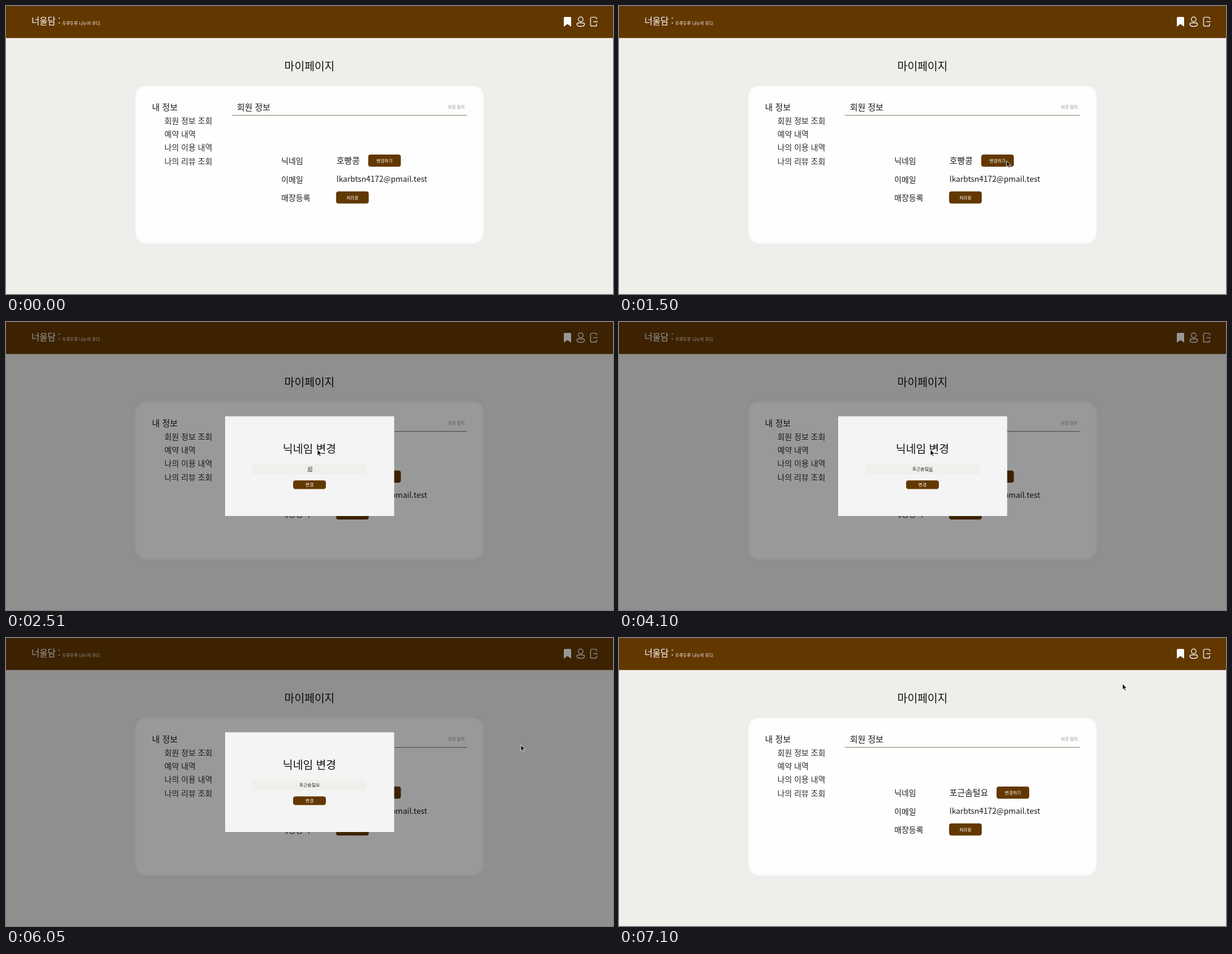
Recreate the animation shown at these times as an HTML page. Size 1000 by 475 pixels, loop 7.12 s.

```html
<!DOCTYPE html>
<html lang="ko">
<head>
<meta charset="utf-8">
<title>마이페이지</title>
<style>
  html, body { margin: 0; width: 100%; height: 100%; overflow: hidden; background: #f0eeeb; }
  svg { display: block; width: 100vw; height: 100vh; }
  text { font-family: "Noto Sans CJK KR", "Noto Sans CJK", "Noto Sans", sans-serif; white-space: pre; }
  .line { fill: none; stroke: #fff; stroke-width: 1.2; stroke-linecap: round; stroke-linejoin: round; }
  .composing { text-decoration: underline; }
</style>
</head>
<body>
<svg id="stage" viewBox="0 0 1000 475" xmlns="http://www.w3.org/2000/svg">
  <defs>
    <filter id="soft" x="-5%" y="-10%" width="110%" height="120%"><feGaussianBlur stdDeviation="2.2"/></filter>
    <clipPath id="cardClip"><rect x="210" y="128" width="580" height="266.5" rx="20"/></clipPath>
  </defs>
  <rect width="1000" height="475" fill="#f0eeeb"/>
  <rect width="1000" height="52.8" fill="#633800"/>

  <path fill="#fff" d="M919 19.5q0-1.5 1.5-1.5h9q1.5 0 1.5 1.5V34l-6-4.3-6 4.3z"/>
  <circle class="line" cx="946.8" cy="22" r="3.9"/>
  <path class="line" d="M943.5 27.8h6.6q3 0 3 2.3c0 2.4-3 3.6-6.3 3.6s-6.3-1.2-6.3-3.6q0-2.3 3-2.3z"/>
  <path class="line" d="M973 21.5v-1q0-2-2-2h-6q-2 0-2 2v10.700q0 2 2 2h6q2 0 2-2v-1.500M968 25.800h6.300"/>

  <rect x="210" y="128" width="580" height="266.5" rx="20" fill="#e8e6e4"/>
  <g clip-path="url(#cardClip)">
    <rect x="212.500" y="131" width="575" height="261.500" rx="18" fill="#fefefe" filter="url(#soft)"/>
  </g>
  <rect x="372" y="179.800" width="387.500" height="1.300" fill="#a0917f"/>
  <g id="page"></g>

  <g id="modal">
    <rect width="1000" height="475" fill="#000" opacity=".4"/>
    <rect x="361" y="155.500" width="278.500" height="164.500" fill="#f4f4f4"/>
    <rect x="406" y="233.500" width="188" height="18" rx="4" fill="#f0efeb"/>
  </g>
  <path id="cursor" d="M0 0v9.800l2.300-2.100 1.600 3.700 1.800-.8-1.600-3.600h3.100z" fill="#111" stroke="#fff" stroke-width=".8" stroke-linejoin="round"/>
</svg>
<script>
const LOOP = 7120, BROWN = '#633800';
const OLD_NAME = '호빵콩', NEW_NAME = '포근솜털요';
const OPEN = 1620, COMMIT = 4760, CLOSE = 6080, RENAME = 6240;
const $ = id => document.getElementById(id);
const page = $('page'), modal = $('modal'), cursor = $('cursor');

function add(parent, tag, attrs, content = '') {
  const el = document.createElementNS('http://www.w3.org/2000/svg', tag);
  for (const key in attrs) el.setAttribute(key, attrs[key]);
  el.textContent = content;
  parent.appendChild(el);
  return el;
}

// Places text by the vertical centre of its syllable blocks.
function label(parent, str, x, mid, size, fill = '#1c1c1c', anchor = 'start') {
  return add(parent, 'text', { x, y: mid + size * 0.38, 'font-size': size, fill, 'text-anchor': anchor }, str);
}

function button(parent, str, x, y, w, h) {
  const g = add(parent, 'g', {});
  add(g, 'rect', { x, y, width: w, height: h, rx: 4, fill: BROWN });
  label(g, str, x + w / 2, y + h / 2, 7.3, '#fff', 'middle');
  return g;
}

label(page, '너울담 :', 42, 25, 14.4, '#fff');
label(page, '두루두루 나누어 주다.', 92.7, 28, 7, '#fff');
label(page, '마이페이지', 500, 99.5, 18, '#111', 'middle');
label(page, '내 정보', 240.5, 166.5, 13.9);
['회원 정보 조회', '예약 내역', '나의 이용 내역', '나의 리뷰 조회'].forEach((s, i) =>
  label(page, s, 261, 189 + i * 22.2, 13, '#2c2c2c'));
label(page, '회원 정보', 380.5, 166.5, 13.9);
label(page, '회원 탈퇴', 728, 166, 7, '#999');
['닉네임', '이메일', '매장등록'].forEach((s, i) =>
  label(page, s, 453.5, 255 + i * 30.6, 13));
const nick = label(page, OLD_NAME, 544.5, 255, 13.9);
label(page, 'lkarbtsn4172@pmail.test', 544.5, 285.5, 12.8);
const edit = button(page, '변경하기', 596.7, 245, 53.8, 20);
button(page, '처리중', 543.8, 305.8, 53.8, 20);

label(modal, '닉네임 변경', 500, 209.5, 18, '#111', 'middle');
button(modal, '변경', 473, 261.3, 54, 14.2);
const field = label(modal, '', 500, 242.5, 7.4, '#222', 'middle');
const done = add(field, 'tspan', {});
const last = add(field, 'tspan', {});
const caret = add(modal, 'rect', { y: 237.5, width: 0.8, height: 10, fill: '#333' });

const typing = [
  [2380, 'ㅍ'], [2460, '포'], [2590, '폭'], [2680, '포그'], [2770, '포근'],
  [2850, '포근ㅅ'], [2990, '포근소'], [3110, '포근솜'], [3240, '포근솜ㅌ'],
  [3420, '포근솜터'], [3600, '포근솜털'], [4100, NEW_NAME]
];

// Each move: start, end, from x, y, to x, y.
const moves = [
  [850, 1450, 1002, 215, 638.5, 255.5],
  [1620, 1910, 638.5, 255.5, 505, 240],
  [2070, 2240, 505, 240, 513, 210.5],
  [4110, 4700, 513, 210.5, 503, 267],
  [5190, 5340, 503, 267, 848, 176.500],
  [7010, 7100, 848, 176.500, 829.500, 75.500]
];

function pointer(t) {
  let at = [1010, 215];
  for (const [start, end, x0, y0, x1, y1] of moves) {
    if (t < start) break;
    const p = Math.min(1, (t - start) / (end - start));
    const e = p * p * (3 - 2 * p);
    at = [x0 + (x1 - x0) * e, y0 + (y1 - y0) * e];
  }
  return at;
}

function draw(t) {
  const renamed = t >= RENAME;
  nick.textContent = renamed ? NEW_NAME : OLD_NAME;
  edit.setAttribute('transform', `translate(${renamed ? 25.3 : 0} 0)`);
  modal.style.display = t >= OPEN && t < CLOSE ? '' : 'none';

  let typed = '';
  for (const [time, str] of typing) if (t >= time) typed = str;
  done.textContent = typed.slice(0, -1);
  last.textContent = typed.slice(-1);
  last.setAttribute('class', t < COMMIT ? 'composing' : '');
  caret.setAttribute('x', 500 + typed.length * 7.4 * 0.46);
  caret.style.display = t >= 2240 && t < 3700 ? '' : 'none';

  const [x, y] = pointer(t);
  cursor.setAttribute('transform', `translate(${x} ${y})`);
}

const begin = performance.now();
function tick() {
  draw((performance.now() - begin) % LOOP);
  requestAnimationFrame(tick);
}
tick();
</script>
</body>
</html>
```
